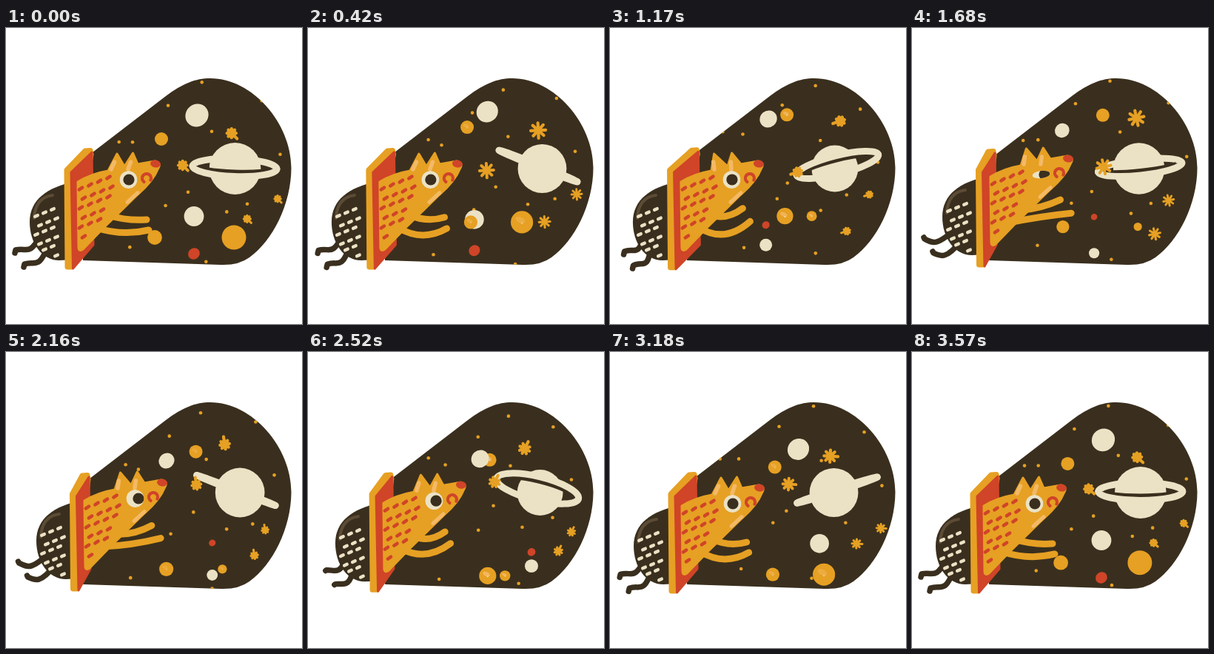
An HTML page with a canvas for the animation above (3.6 s loop, 400x400 px).

```html
<!DOCTYPE html>
<html lang="en">
<head>
<meta charset="utf-8">
<title>Fox in space</title>
<style>
html, body { margin: 0; width: 100%; height: 100%; overflow: hidden; background: #fff; }
canvas { display: block; width: 400px; height: 400px; }
</style>
</head>
<body>
<canvas id="stage"></canvas>
<script>
const LOOP = 3600, STEP = 30;
const DARK = '#3a2f1e', ORANGE = '#e6a023', RED = '#d04428', CREAM = '#ebe2c5',
      LIGHT = '#f3b966', SHINE = '#5c4c36';
const canvas = document.getElementById('stage'), g = canvas.getContext('2d');
const ratio = window.devicePixelRatio || 1;
canvas.width = canvas.height = 400 * ratio;

// Angles are in degrees throughout.
const rad = deg => deg * Math.PI / 180;
const cos = deg => Math.cos(rad(deg)), sin = deg => Math.sin(rad(deg));
const smooth = (from, to, v) => {
  const u = Math.min(1, Math.max(0, (v - from) / (to - from)));
  return u * u * (3 - 2 * u);
};
const bump = (t, mid, half) => smooth(half, 0, Math.abs(t - mid));

function oval(x, y, rx, ry, color, rot = 0) {
  g.beginPath();
  g.ellipse(x, y, rx, ry, rad(rot), 0, 7);
  g.fillStyle = color;
  g.fill();
}
const disc = (x, y, r, color) => oval(x, y, r, r, color);

function stroke(path, color, width) {
  g.strokeStyle = color;
  g.lineWidth = width;
  g.stroke(new Path2D(path));
}
function shape(path, color, round = 0) {
  g.fillStyle = color;
  g.fill(new Path2D(path));
  if (round) stroke(path, color, round);
}
function dash(x, y, len, angle, color, width) {
  const dx = cos(angle) * len / 2, dy = sin(angle) * len / 2;
  stroke(`M${x - dx} ${y - dy}L${x + dx} ${y + dy}`, color, width);
}

const BULB = 'M104 178L216 92C239 75 256 68 276 68C333 68 385.5 129 385.5 189' +
  'C385.5 238 360 288 329 310Q314 321 290 320L104 314Z';

// Orbit centre and start angle
const DOTS = [
  [270, 79, 227], [339, 102, -30], [226, 108, 205], [278, 147.5, 270], [363.5, 174, -25],
  [156, 147, 115], [178, 151, 155], [223, 238, 165], [246, 214, 90], [292, 244, 35],
  [326, 230, 90], [174, 300, 210], [277, 312, 150]
];
function dots(deg) {
  for (const [x, y, a] of DOTS)
    disc(x + 7.7 * cos(a - 2 * deg), y + 7.7 * sin(a - 2 * deg), 2.3, ORANGE);
}

// Orbit centre, start angle and scale
const STARS = [[303, 132, 80, 1], [249, 185.5, 180, .95], [357, 233, -12, .7], [328, 268, 258, .74]];
function stars(deg) {
  const pulse = cos(3 * deg + 30);
  for (const [x, y, a, scale] of STARS) {
    g.save();
    g.translate(x + 10.3 * cos(a - deg), y + 10.3 * sin(a - deg));
    g.scale(scale, scale);
    g.rotate(rad(45 + deg));
    for (let i = 0; i < 8; i++) {
      dash(4, 0, i ? 8 - 4.4 * pulse : 13, 0, ORANGE, 4.2);
      g.rotate(Math.PI / 4);
    }
    disc(0, 0, 5.6 + pulse, ORANGE);
    g.restore();
  }
}

function saturn(deg) {
  const c = cos(2 * deg), s = sin(2 * deg);
  const ry = 15.5 * c - 3.5, tall = Math.abs(ry), front = ry > 0 ? 0 : Math.PI;
  const ring = (from, inset, color, width) => {
    g.beginPath();
    g.ellipse(309 + 2 * s, 186.3 + 2.2 * c, 57 - inset, Math.max(0, tall - inset),
      rad(2 + 20 * s), from, from + Math.PI);
    g.strokeStyle = color;
    g.lineWidth = width;
    g.stroke();
  };
  ring(front + Math.PI, 0, CREAM, 9);
  disc(309.5 + 7 * s, 190, 32.7 + 2.2 * c, CREAM);
  const gap = Math.min(1, tall / 7);
  g.lineCap = 'butt';
  if (gap > .2) ring(front, 5 * gap, DARK, 8 * gap);
  g.lineCap = 'round';
  ring(front, 0, CREAM, 9);
}

function goldPlanet(x, y, r, deg) {
  disc(x, y, r, ORANGE);
  g.globalAlpha = (1 - cos(2 * deg)) / 2;
  oval(x - r * .15, y - r * .2, r * .45, r * .25, LIGHT, 25);
  disc(x, y + r * .08, r * .1, CREAM);
  g.globalAlpha = 1;
}

function planets(deg) {
  const swing = 8 * sin(2 * deg), a = deg - swing, b = deg + swing;
  const cb = cos(b), sb = sin(b);
  const pale = () => {
    const r = 13 + 3 * cb;
    oval(231 + 27 * cb - 8 * sb, 130 - 12 * cb - 12 * sb, r, r * .94, CREAM, -40);
  };
  const gold = () => goldPlanet(235 - 25 * cb - 5 * sb, 135.5 + 14.5 * cb - 14 * sb, 9, deg);
  for (const planet of deg < 190 ? [pale, gold] : [gold, pale]) planet();

  const ca = cos(a), x = 254 - 52 * sin(a), y = 279 - 25 * sb + 4 * cb;
  oval(x, 280 + 25 * ca, 6.3 + 1.9 * ca, 5.8 + 1.6 * ca, RED, -40);
  disc(x, 279.5 - 25 * ca, 10.2 + 3.2 * ca, CREAM);
  goldPlanet(254 - 53 * cb, y, 7.7 + 2.2 * cb, deg);
  goldPlanet(255 + 53 * cb, y, 12.5 + 4 * cb, deg);
}

function rear(deg, lean, dx, dy) {
  const curl = ((1 - cos(2 * deg)) / 2) ** 3;
  for (const i of [0, 1]) {
    const footX = 13 + 13 * curl + 4 * lean + 12 * i, footY = 300 + 4 * curl - 15 * lean + 19 * i;
    const kneeX = 30 + 15 * curl + 3 * lean + 14 * i, kneeY = 309 + 4 * curl - 15 * lean + 18 * i;
    const heelX = 29 + 8 * curl + 10 * i, heelY = 296 - 5 * lean + 18 * i;
    stroke(`M${47 + 9 * i + dx} ${281 + 15 * i + dy}C${kneeX} ${kneeY} ${heelX} ${heelY} ` +
      `${footX} ${footY}l-1 ${4 - 6 * lean}`, DARK, 7.5);
  }
  g.save();
  g.translate(dx, dy);
  shape('M92 208C56 215 32 232 32 262C32 290 48 314 72 314L92 313Z', DARK);
  stroke('M38 257C39 239 47 228 63 226', SHINE, 4);
  for (let j = 0; j < 6; j++)
    for (let i = 0; i < 4; i++) {
      const x = 41 + 11 * i + j % 2 * 5, y = 254 + 12.5 * j - 4.5 * i;
      if (x < 74 && Math.hypot((x - 68) / 29, (y - 268) / 40) < 1) dash(x, y, 4, -25, CREAM, 4.4);
    }
  g.restore();
}

function hatch(lean, pull) {
  const l = 78.5 + 7.5 * lean - 2 * pull, r = 118 - 4 * lean + 4.5 * pull;
  const top = 162 + lean - pull, bot = 327 - 3 * lean + pull;
  shape(`M${l + 3.5} 192L${r - 11} ${top + 4}L${r - 4} ${top + 3.5}L${r - 3} ${top + 9}` +
    `L${l + 10} ${bot - 4}L${l + 4.5} ${bot - 4}Z`, ORANGE, 7);
  shape(`M${l + 9.5} 195L${r - 2} ${top + 6}L${r} 293L${l + 12} ${bot - 2}Z`, RED, 3);
}

function arm(x, y, endX, endY, sag) {
  stroke(`M${x} ${y}Q${(x + endX) / 2} ${(y + endY) / 2 + sag} ${endX} ${endY}`, ORANGE, 9);
}

function fox(t, deg, lean, dx, dy) {
  const reach = cos(2 * deg), ears = -4.5 * lean - 11 * bump(t, 1300, 400);
  g.save();
  g.translate(dx, dy);
  arm(138, 253, 184 + 6 * reach + 2 * lean, 249 - 10 * cos(deg - 175), 9 - 4 * reach);
  arm(122, 270, 192 + 8 * reach - 7 * cos(deg), 265 + 8 * cos(deg), 20 - 10 * reach - 13 * lean);

  const tips = [[150 + ears, 142], [171.5 + ears * .7, 165]];
  shape(`M97 208Q115 197 138 193L${tips[0][0]} 170L160 187L${tips[1][0]} 169L178 184L201 180` +
    'Q210 182 206 189Q199 207 178 225L132 270L104 299Q98 303 98 296Z', ORANGE, 3);
  for (const [x, base] of tips)
    stroke(`M${x * .7 + base * .3 - 1} 181L${base} 191`, LIGHT, 5.5);
  for (let j = 0; j < 7; j++)
    for (let i = 0; i < 5; i++) {
      const x = 101 + 12.5 * i + j % 2 * 4, y = 217 + 13 * j - 5 * i;
      if (x < 149 && y > 200 && x + (y - 216) * .75 < 160) dash(x, y, 5, -34, RED, 4.6);
    }
  dash(171, 229, 19, -42, LIGHT, 5);

  const shut = bump(t, 1680, 180);
  g.save();
  g.beginPath();
  g.ellipse(165.5, 205, 12, 12 - 7 * shut, -.12 * shut, 0, 7);
  g.clip();
  disc(165.5, 205, 12, CREAM);
  disc(166 + 4 * lean, 205, 7.6, DARK);
  g.restore();

  g.beginPath();
  g.arc(190, 203, 6, rad(125), rad(385));
  g.strokeStyle = RED;
  g.lineWidth = 4.2;
  g.stroke();
  oval(202, 183.5, 7, 5, RED, 8);
  g.restore();
}

function puffs(t) {
  const u = (t - 2640) / 360;
  if (u <= 0 || u >= 1) return;
  const size = sin(180 * u), r = 43 + 14 * u;
  for (let i = 0; i < 4; i++) {
    const a = 204 + 22 * i;
    dash(118 + r * cos(a), 190 + r * sin(a), (4 + 4 * sin(60 * i)) * size, a, RED, 7.5 * size);
  }
}

function draw(t) {
  const deg = t / LOOP * 360;
  const lean = smooth(.2, .85, cos(deg - 195)), pull = bump(t, 950, 650);
  const dx = 9 * lean - 1.5 * pull, dy = -7 * lean;
  g.setTransform(ratio, 0, 0, ratio, 0, 0);
  g.fillStyle = '#fff';
  g.fillRect(0, 0, 400, 400);
  g.lineCap = g.lineJoin = 'round';
  shape(BULB, DARK);
  g.save();
  g.clip(new Path2D(BULB));
  dots(deg);
  planets(deg);
  saturn(deg);
  stars(deg);
  g.restore();
  rear(deg, lean, dx, dy);
  hatch(lean, pull);
  fox(t, deg, lean, dx, dy);
  puffs(t);
}

const start = performance.now();
function tick() {
  const t = (performance.now() - start) % LOOP;
  draw(Math.floor(t / STEP) * STEP);
  requestAnimationFrame(tick);
}
tick();
</script>
</body>
</html>
```
